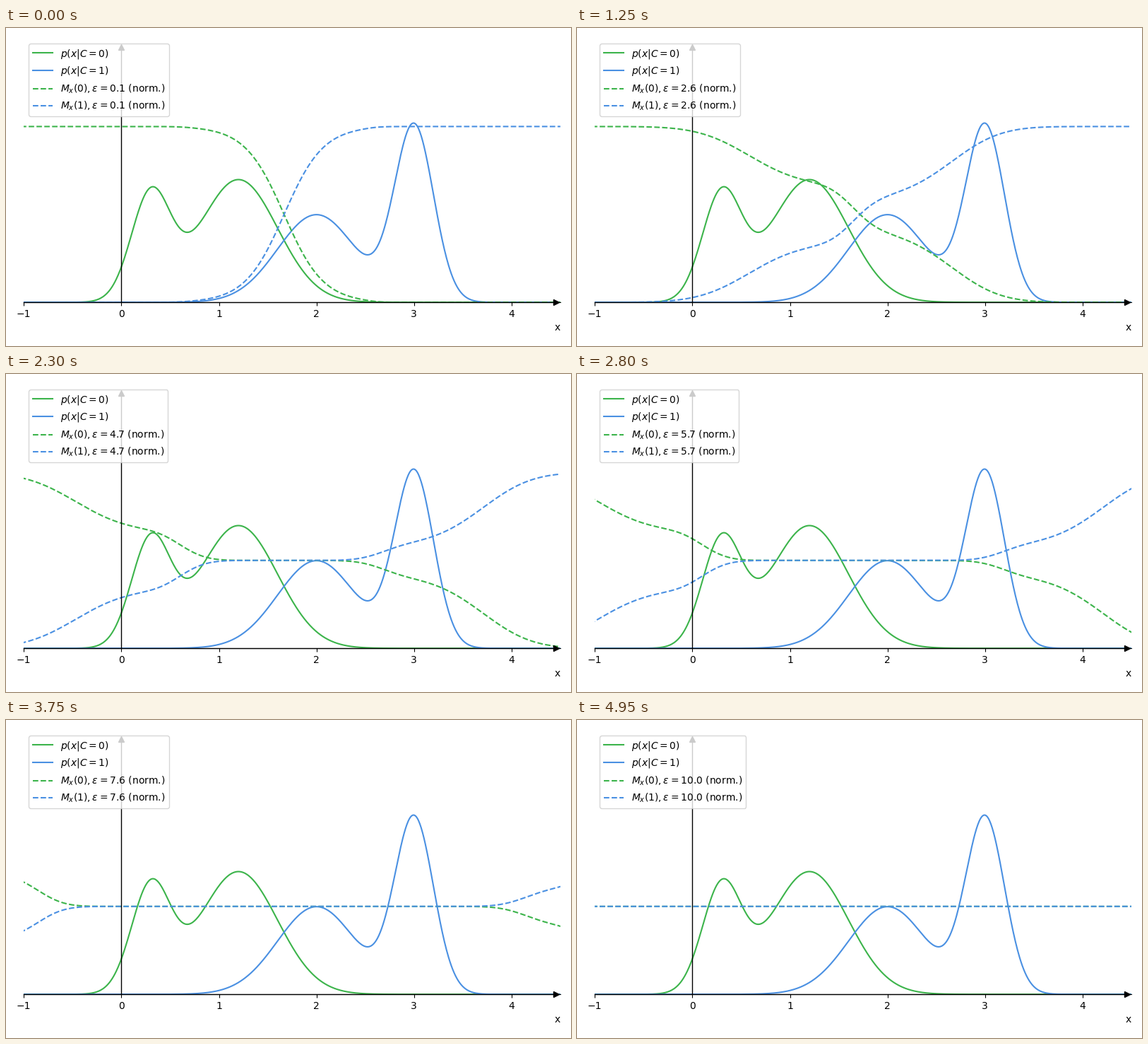
Write a matplotlib script that moves like this. It is 800 by 450 pixels and loops after 5 s.

```python
import math

import matplotlib.pyplot as plt
import numpy as np
from matplotlib.animation import FuncAnimation

W, H, DPI = 800, 450, 100
FRAMES, INTERVAL = 100, 50
GREEN, BLUE = "#3cb44b", "#4a90e2"

# Axes edges in pixels, measured from the bottom left
LEFT, RIGHT, BOTTOM, TOP = 25.25, 785, 61.8, 435

# Mixture components: (weight, mean, standard deviation)
CLASS_0 = [(0.3, 0.3, 0.2), (0.7, 1.2, 0.4)]
CLASS_1 = [(0.5, 2.0, 0.4), (0.5, 3.0, 0.2)]

erfc = np.vectorize(math.erfc)
x = np.linspace(-2, 5, 1000)


def density(mix):
    return sum(w / (s * math.sqrt(2 * math.pi)) * np.exp(-((x - m) / s) ** 2 / 2)
               for w, m, s in mix)


def mass(mix, eps):
    """Probability of the window of width eps centred on each x."""
    def cdf(t):
        return sum(w / 2 * erfc((m - t) / (s * math.sqrt(2))) for w, m, s in mix)
    return cdf(x + eps / 2) - cdf(x - eps / 2)


plt.rcParams["font.family"] = "DejaVu Sans"
fig = plt.figure(figsize=(W / DPI, H / DPI), dpi=DPI)
ax = fig.add_axes([LEFT / W, BOTTOM / H, (RIGHT - LEFT) / W, (TOP - BOTTOM) / H])
ax.set_xlim(-1, 4.5)
ax.set_ylim(0, 1.5)
ax.set_xticks(range(-1, 5))
ax.set_yticks([])
ax.set_xlabel("x", loc="right")
for side in ("left", "right", "top"):
    ax.spines[side].set_visible(False)

ax.plot(x, density(CLASS_0), color=GREEN, label="$p(x|C=0)$")
ax.plot(x, density(CLASS_1), color=BLUE, label="$p(x|C=1)$")
curves = [ax.plot(x, 0 * x, "--", color=c, label="$M$")[0] for c in (GREEN, BLUE)]

# Axis arrows
axis_style = dict(color="black", lw=1, zorder=3)
ax.plot([-1, 4.46], [0, 0], clip_on=False, **axis_style)
ax.plot([0, 0], [0, 1.45], **axis_style)
ax.plot(4.46, 0, ">k", clip_on=False, zorder=3)
ax.plot(0, 1.45, "^k", zorder=3)
ax.set_xlim(-1, 4.5)

legend = ax.legend(loc="upper left")
labels = legend.get_texts()[2:]


def update(frame):
    eps = 0.1 * (frame + 1)
    masses = [mass(CLASS_0, eps), mass(CLASS_1, eps)]
    total = sum(masses)
    for k, (curve, label) in enumerate(zip(curves, labels)):
        curve.set_ydata(masses[k] / total)
        label.set_text(rf"$M_x({k}), \varepsilon={eps:.1f}$ (norm.)")
    return curves + labels


anim = FuncAnimation(fig, update, frames=FRAMES, interval=INTERVAL,
                     repeat=True, repeat_delay=0)
plt.show()
```
